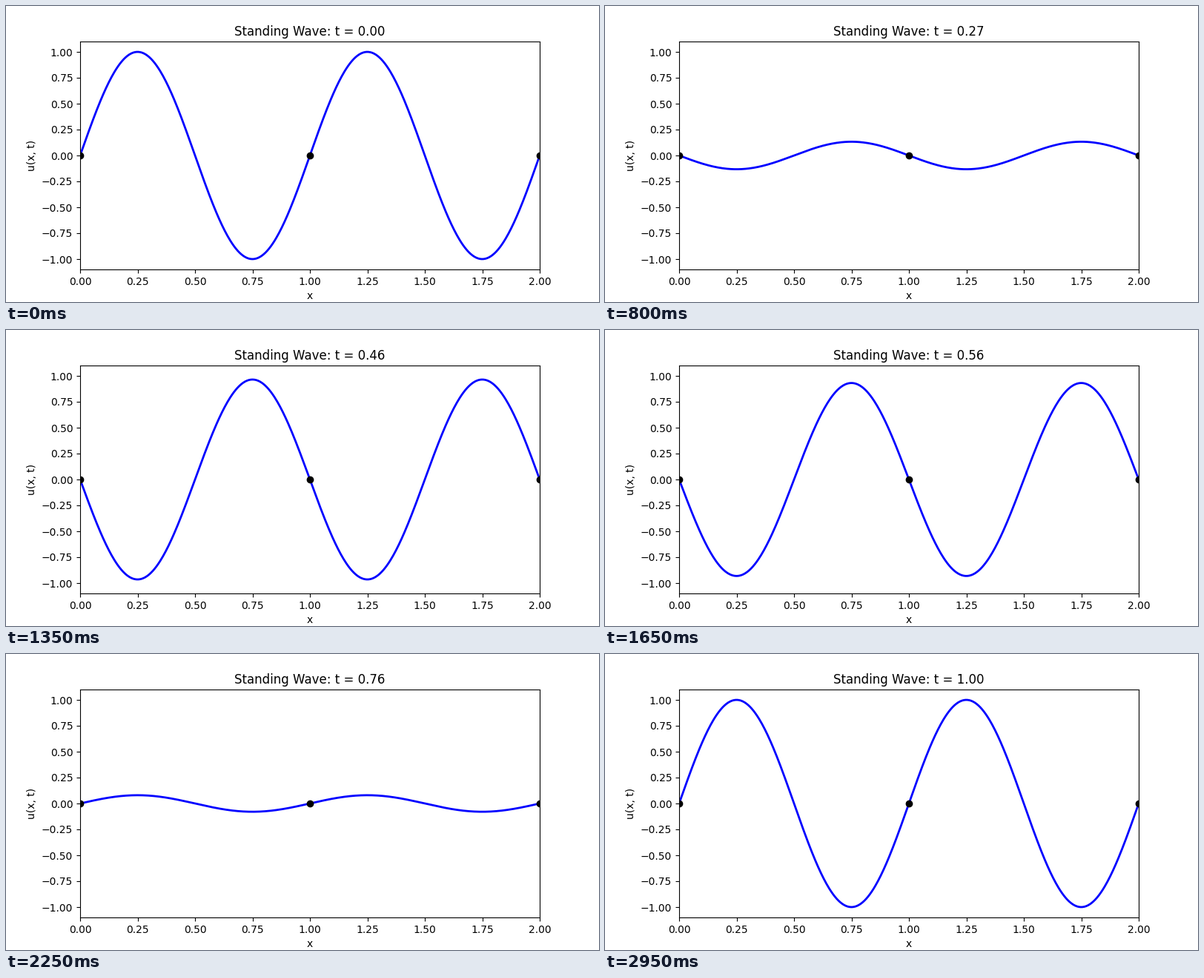
Recreate the animation shown at these times as a matplotlib script. Size 800x400 px, loop 3000 ms.

```python
import numpy as np
import matplotlib.pyplot as plt
from matplotlib.animation import FuncAnimation

FRAMES = 60
INTERVAL = 50
LENGTH = 2.0

x = np.linspace(0, LENGTH, 500)
shape = np.sin(2 * np.pi * x)
times = np.linspace(0, 1, FRAMES)

fig, ax = plt.subplots(figsize=(8, 4), dpi=100)
ax.set_xlim(0, LENGTH)
ax.set_ylim(-1.1, 1.1)
ax.set_xlabel("x")
ax.set_ylabel("u(x, t)")
title = ax.set_title("")

wave, = ax.plot([], [], "b-", lw=2)
ax.plot([0, 1, 2], [0, 0, 0], "ko", ms=6)  # fixed nodes


def update(i):
    t = times[i]
    wave.set_data(x, shape * np.cos(2 * np.pi * t))
    title.set_text(f"Standing Wave: t = {t:.2f}")
    return wave, title


anim = FuncAnimation(fig, update, frames=FRAMES, interval=INTERVAL,
                     repeat=True, repeat_delay=0, blit=False)
plt.show()
```
